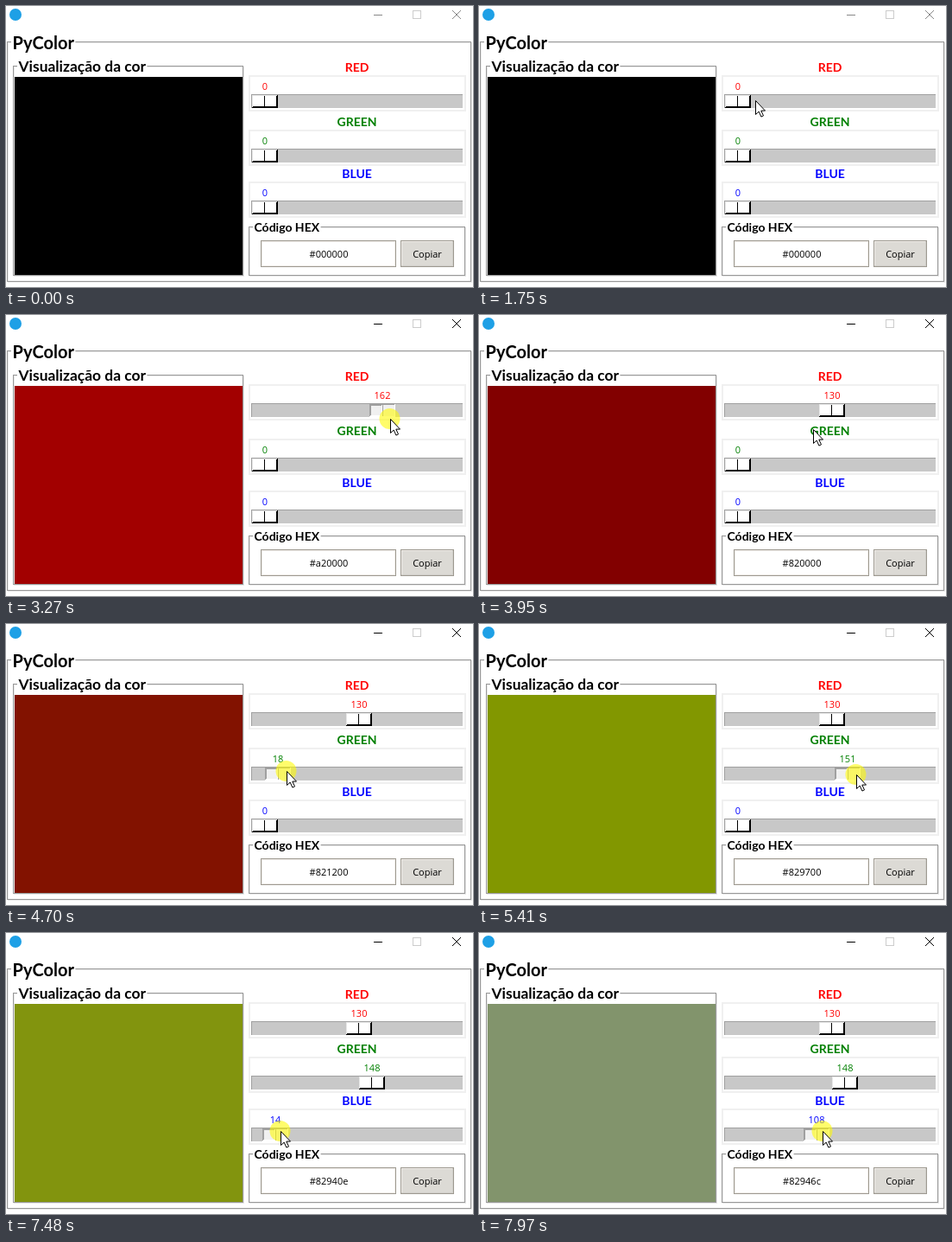
Animation of 541x325 px, one loop 8000 ms. Source, as an HTML page with a canvas:

```html
<!DOCTYPE html>
<html lang="pt">
<head>
<meta charset="utf-8">
<title>PyColor</title>
<style>
html, body { margin: 0; width: 100%; height: 100%; overflow: hidden; background: #fff; }
canvas { display: block; width: 541px; height: 325px; }
</style>
</head>
<body>
<canvas id="stage" width="541" height="325"></canvas>
<script>
const ctx = document.getElementById('stage').getContext('2d');
const LOOP = 8000, TICK = 70, PHASE = 10;
const ENTER = 920, FOCUS = 2160;
const HEAD = 'Lato, "Open Sans", sans-serif';
const BODY = '11px "Open Sans", "Noto Sans", sans-serif';

// keys: time and value, from the mouse's arrival at the thumb until it leaves.
// grip and y place the mouse on the thumb; drift lowers it as the value grows.
const sliders = [
  { name: 'RED', color: '#f00', trough: 102, press: [FOCUS, 3860], grip: 24, y: 110, drift: 0.06,
    keys: [[1950, 0], [2110, 0], [3240, 163], [3510, 163], [3790, 130]] },
  { name: 'GREEN', color: '#008000', trough: 165, press: [4350, 6700], grip: 25, y: 169, drift: 0.03,
    keys: [[4280, 0], [4350, 0], [4700, 18], [5400, 151], [5820, 221], [6170, 199], [6520, 148], [6660, 148]] },
  { name: 'BLUE', color: '#00f', trough: 225, press: [7360, LOOP], grip: 22, y: 229, drift: 0,
    keys: [[7360, 0], [7920, 108]] }
];

const lerp = (a, b, u) => a + (b - a) * u;
const thumbX = value => 285 + value * 0.84;

// Straight-line motion through rows of [time, ...numbers], held at both ends.
function track(rows, t, col = 1) {
  const next = rows.findIndex(row => row[0] >= t);
  if (next < 0) return rows[rows.length - 1][col];
  if (next === 0) return rows[0][col];
  const a = rows[next - 1], b = rows[next];
  return lerp(a[col], b[col], (t - a[0]) / (b[0] - a[0]));
}

// The mouse follows the thumb it drags and glides on to the next one.
const grab = (s, [t, value]) => [t, thumbX(value) + s.grip, s.y + value * s.drift];
const path = [
  [ENTER, 508, 319], [1620, 320, 109], [1740, 320, 109],
  ...sliders.flatMap(s => s.keys.map(key => grab(s, key)))
];

function rect(x, y, w, h, color) {
  ctx.fillStyle = color;
  ctx.fillRect(x, y, w, h);
}

function outline(x, y, w, h, color, width = 1) {
  ctx.strokeStyle = color;
  ctx.lineWidth = width;
  ctx.strokeRect(x + width / 2, y + width / 2, w - width, h - width);
}

// Box with one colour on its top and left edges, another on bottom and right.
function bevel(x, y, w, h, light, dark, width = 1) {
  rect(x, y, w, width, light);
  rect(x, y, width, h, light);
  rect(x, y + h - width, w, width, dark);
  rect(x + w - width, y, width, h, dark);
}

function text(str, x, y, font, color = '#000', align = 'center') {
  ctx.font = font;
  ctx.fillStyle = color;
  ctx.textAlign = align;
  ctx.fillText(str, x, y);
}

function line(x1, y1, x2, y2, color) {
  ctx.beginPath();
  ctx.moveTo(x1, y1);
  ctx.lineTo(x2, y2);
  ctx.strokeStyle = color;
  ctx.lineWidth = 1;
  ctx.stroke();
}

function disc(x, y, r, color) {
  ctx.beginPath();
  ctx.arc(x, y, r, 0, Math.PI * 2);
  ctx.fillStyle = color;
  ctx.fill();
}

function group(x, y, w, h, label, size) {
  outline(x + 1, y + 1, w, h, '#e8e8e8');
  outline(x, y, w, h, '#999');
  ctx.font = `bold ${size}px ${HEAD}`;
  rect(x + 5, y - 1, ctx.measureText(label).width + 3, 4, '#fff');
  text(label, x + 6.5, y + size * 0.43, ctx.font, '#000', 'left');
}

function titleBar(active) {
  const ink = active ? '#000' : '#888';
  disc(11, 10, 7, '#1ea0e6');
  line(426, 10.5, 436, 10.5, ink);
  outline(471, 5, 10, 10, '#ccc');
  line(517, 5, 527, 15, ink);
  line(527, 5, 517, 15, ink);
}

function thumb(x, y, pressed) {
  if (pressed) {
    rect(x, y, 30, 15, '#f0f0f0');
    bevel(x, y, 30, 15, '#a0a0a0', '#fff');
    bevel(x + 1, y + 1, 14, 13, '#a0a0a0', '#fff');
    rect(x + 15, y + 1, 1, 13, '#a0a0a0');
  } else {
    rect(x, y, 30, 15, '#fff');
    bevel(x, y, 30, 15, '#e8e8e8', '#000');
    rect(x + 1, y + 13, 28, 1, '#000');
    rect(x + 28, y + 1, 1, 13, '#000');
    rect(x + 14, y + 1, 1, 13, '#000');
  }
}

function slider(s, value, pressed) {
  const x = Math.round(thumbX(value)), y = s.trough;
  text(s.name, 406.5, y - 26, `bold 14px ${HEAD}`, s.color);
  outline(281, y - 22, 252, 42, '#f0f0f0', 2);
  rect(284, y, 246, 17, '#c8c8c8');
  bevel(284, y, 246, 17, '#a0a0a0', '#fff');
  thumb(x, y + 1, pressed);
  text(value, x + 15, y - 5, BODY, s.color);
}

function hexBox(hex) {
  group(281, 255, 251, 57, 'Código HEX', 14);
  outline(295, 271, 157, 31, '#9e9a91');
  outline(296, 272, 155, 29, '#eeebe7');
  text(hex, 374, 291, BODY);
  rect(457, 271, 62, 31, '#dcdad5');
  outline(457, 271, 62, 31, '#9e9a91');
  bevel(458, 272, 60, 29, '#eeebe7', '#cfcdc8');
  text('Copiar', 488, 291, BODY);
}

function pointer(x, y) {
  ctx.beginPath();
  [[0, 0], [0, 16], [3.7, 12.6], [6.4, 18.6], [9, 17.4], [6.3, 11.6], [11, 11.6]]
    .forEach(([dx, dy]) => ctx.lineTo(x + dx + 0.5, y + dy + 0.5));
  ctx.closePath();
  ctx.fillStyle = '#fff';
  ctx.fill();
  ctx.strokeStyle = '#000';
  ctx.lineWidth = 1;
  ctx.stroke();
}

function draw(time) {
  const t = Math.floor((time - PHASE) / TICK) * TICK + PHASE;
  const values = sliders.map(s => Math.round(track(s.keys, t)));
  const held = sliders.map(s => time >= s.press[0] && time < s.press[1]);
  const hex = '#' + values.map(v => v.toString(16).padStart(2, '0')).join('');

  rect(0, 0, 541, 325, '#fff');
  titleBar(time >= FOCUS);
  group(1, 41, 538, 278, 'PyColor', 20);
  group(8, 69, 267, 243, 'Visualização da cor', 17.4);
  rect(10, 82, 264, 229, hex);
  sliders.forEach((s, i) => slider(s, values[i], held[i]));
  hexBox(hex);

  if (time >= ENTER) {
    const x = Math.round(track(path, t, 1)), y = Math.round(track(path, t, 2));
    if (held.includes(true)) disc(x - 0.5, y, 12, 'rgba(255,250,0,.58)');
    pointer(x, y);
  }
}

const began = performance.now();
function tick() {
  draw((performance.now() - began) % LOOP);
  requestAnimationFrame(tick);
}
tick();
</script>
</body>
</html>
```
